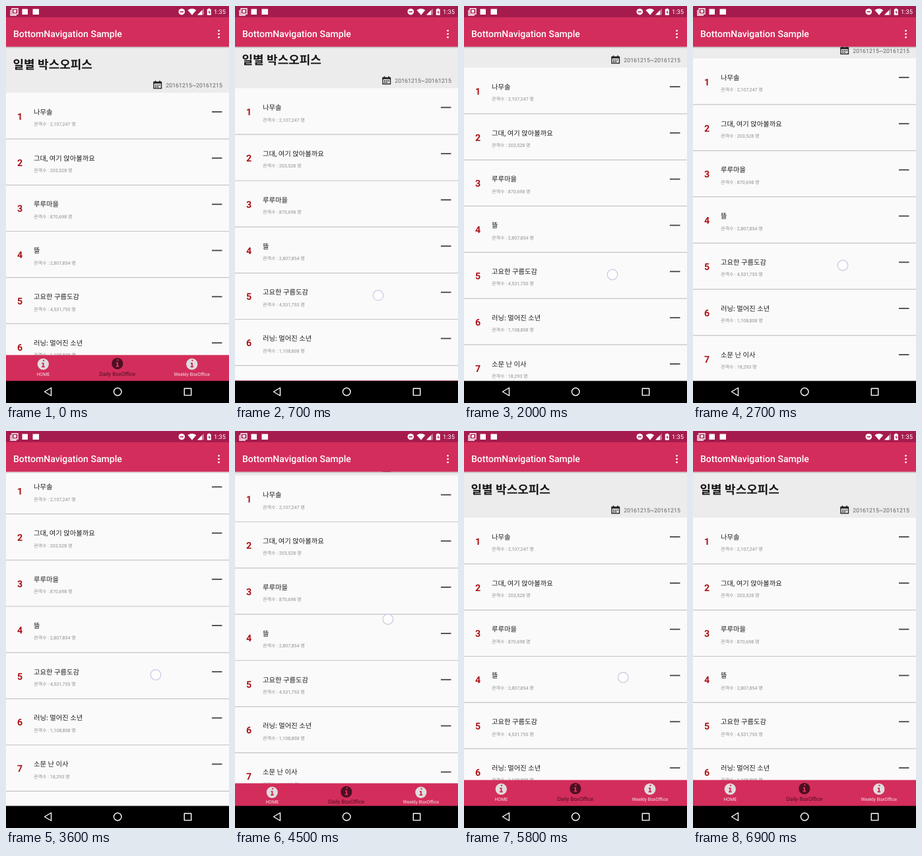
Recreate the animation shown at these times as an HTML page. Size 338 px wide and 600 px high, loop 7 s.

```html
<!DOCTYPE html>
<html lang="ko">
<head>
<meta charset="utf-8">
<style>
  html, body { margin: 0; width: 100%; height: 100%; overflow: hidden; background: #000; }
  svg {
    display: block; width: 338px; height: 600px;
    font-family: Roboto, "Noto Sans CJK KR", "Noto Sans CJK", sans-serif;
    text-rendering: geometricPrecision;
  }
  .rank { font-size: 14.2px; font-weight: 700; fill: #ac1119; text-anchor: middle; }
  .title { font-size: 10.3px; font-weight: 500; fill: #1c1c1c; }
  .sub { font-size: 7.1px; fill: #8f8f8f; }
  .label { text-anchor: middle; }
</style>
</head>
<body>
<svg viewBox="0 0 338 600">
  <linearGradient id="shade" x2="0" y2="1">
    <stop stop-opacity=".22"/>
    <stop offset="1" stop-opacity="0"/>
  </linearGradient>
  <rect width="338" height="600" fill="#fafafa"/>
  <g id="page">
    <rect y="61" width="338" height="70" fill="#ececec"/>
    <text x="10.5" y="94.8" font-size="18" font-weight="700" fill="#161616">일별 박스오피스</text>
    <g fill="none" stroke="#222">
      <rect x="224" y="115" width="11.5" height="9.5" stroke-width="1.4"/>
      <path d="M223.5 116h12.5" stroke-width="2.6"/>
      <path d="M226.5 112.8v3M233 112.8v3" stroke-width="1.6"/>
      <path d="M226 119.6h8M226 122.2h6" stroke-width="1.4" stroke-dasharray="2 .8"/>
    </g>
    <text x="328" y="122.8" font-size="8.9" fill="#666" text-anchor="end">20161215~20161215</text>
    <g id="rows"></g>
  </g>

  <g id="tabs">
    <rect y="527.5" width="338" height="40" fill="#d32d5b"/>
  </g>

  <rect y="566.6" width="338" height="34"/>
  <g fill="none" stroke="#fff" stroke-width="1.4" stroke-linejoin="round">
    <path d="M68.5 577v12L58.5 583z"/>
    <circle cx="169.2" cy="583" r="5.8"/>
    <rect x="270.3" y="578" width="10.4" height="10.4"/>
  </g>

  <rect y="61.5" width="338" height="3" fill="url(#shade)"/>
  <rect y="16" width="338" height="45.6" fill="#d32d5b"/>
  <rect width="338" height="17" fill="#a61b4d"/>
  <text x="11" y="47.4" font-size="14.05" font-weight="500" fill="#fff">BottomNavigation Sample</text>
  <g fill="#fff">
    <circle cx="322.6" cy="37.3" r="1.4"/>
    <circle cx="322.6" cy="42.3" r="1.4"/>
    <circle cx="322.6" cy="47.3" r="1.4"/>
    <path d="M9 4h9v8h-9zM7 6v8h9" fill="none" stroke="#fff" stroke-width="1.3"/>
    <rect x="11.5" y="6" width="4" height="4"/>
    <rect x="24.5" y="4.5" width="8.5" height="8.5"/>
    <rect x="40.5" y="4.5" width="9.5" height="8.5"/>
    <circle cx="266.3" cy="8.7" r="4.8"/>
    <path d="M263.6 8.7h5.4" stroke="#a61b4d" stroke-width="1.5"/>
    <path d="M275.5 6.2Q282 1.8 288.3 6.2L282 13.8z"/>
    <path d="M299.8 3.8v9.8H290z" opacity=".45"/>
    <path d="M297 6.6v7H290z"/>
    <path d="M304.8 4.8h1.7V3.7h2.6v1.1h1.7v9h-6z"/>
    <path d="M308.4 6.2l-2 3.5h1.4v2.8l2-3.6h-1.4z" fill="#a61b4d"/>
    <text x="315" y="12.2" font-size="9.4">1:35</text>
  </g>

  <circle id="touch" r="7.8" fill="#fff" fill-opacity=".8" stroke="#cccbe4" stroke-width="1.3"/>
</svg>
<script>
const LOOP = 7000, ROW = 69.83, MAX_SCROLL = 77;
const $ = id => document.getElementById(id);

const films = [
  ['나무솔', '2,107,247'],
  ['그대, 여기 앉아볼까요', '203,528'],
  ['루루마을', '870,698'],
  ['뜰', '2,807,854'],
  ['고요한 구름도감', '4,531,755'],
  ['러닝: 멀어진 소년', '1,108,808'],
  ['소문 난 이사', '18,293'],
  ['파란 우산', '15,204']
];
$('rows').innerHTML = films.map(([title, seen], i) => `
  <g transform="translate(0 ${131 + i * ROW})">
    <text class="rank" x="21" y="40.8">${i + 1}</text>
    <text class="title" x="42" y="32.8">${title}</text>
    <text class="sub" x="42" y="50.2">관객수 : ${seen} 명</text>
    <path d="M312 29h15.5" stroke="#444" stroke-width="1.8"/>
    <path d="M0 ${ROW}h338" stroke="#c4c4c4" stroke-width="1.2"/>
  </g>`).join('');

const tab = (x, y, name, size, color, ink) => `
  <circle cx="${x}" cy="${y}" r="8.6" fill="${color}"/>
  <path d="M${x - 1.8} ${y - 1.2}h2v5.2m-2.4 0h4.6M${x - .4} ${y - 5.4}h2.2" fill="none" stroke="#d32d5b" stroke-width="2"/>
  <text class="label" x="${x}" y="558.6" font-size="${size}" fill="${ink}">${name}</text>`;
$('tabs').innerHTML +=
  tab(56.3, 541.2, 'HOME', 6.95, '#dedede', '#f6e4ea') +
  tab(168.8, 540.4, 'Daily BoxOffice', 8.2, '#4c1022', '#4c1022') +
  tab(281.8, 541.2, 'Weekly BoxOffice', 7.1, '#dedede', '#f6e4ea');

// Finger tracks: [time, x, y]
const dragUp = [[250, 215, 451], [500, 216, 444], [1300, 220, 417.5], [2000, 225, 406],
  [2700, 227, 392], [3600, 227, 368.5], [3900, 227, 367]];
const dragDown = [[4100, 230, 264], [4300, 231, 271], [5100, 234, 324.5], [5550, 239, 348],
  [6000, 243, 392], [6450, 236, 437]];

const clamp = (v, lo, hi) => Math.min(hi, Math.max(lo, v));

function along(track, t) {
  t = clamp(t, track[0][0], track.at(-1)[0]);
  const i = Math.max(1, track.findIndex(p => p[0] >= t));
  const [a, b] = [track[i - 1], track[i]];
  const k = (t - a[0]) / (b[0] - a[0]);
  return [a[1] + (b[1] - a[1]) * k, a[2] + (b[2] - a[2]) * k];
}

const easeOut = (t, start, span) => 1 - (1 - clamp((t - start) / span, 0, 1)) ** 3;

function draw(now) {
  const t = now % LOOP;
  const up = t < 4000;
  const track = up ? dragUp : dragDown;
  const [x, y] = along(track, t);
  const scroll = clamp((up ? 444 : 348) - y, 0, MAX_SCROLL);
  const hidden = easeOut(t, 500, 300) - easeOut(t, 4350, 300);
  const touching = t >= track[0][0] && t <= track.at(-1)[0];

  $('page').setAttribute('transform', `translate(0 ${-scroll})`);
  $('tabs').setAttribute('transform', `translate(0 ${40 * hidden})`);
  $('touch').setAttribute('transform', `translate(${x} ${y})`);
  $('touch').setAttribute('visibility', touching ? 'visible' : 'hidden');
}

const start = performance.now();
(function tick() {
  draw(performance.now() - start);
  requestAnimationFrame(tick);
})();
</script>
</body>
</html>
```
